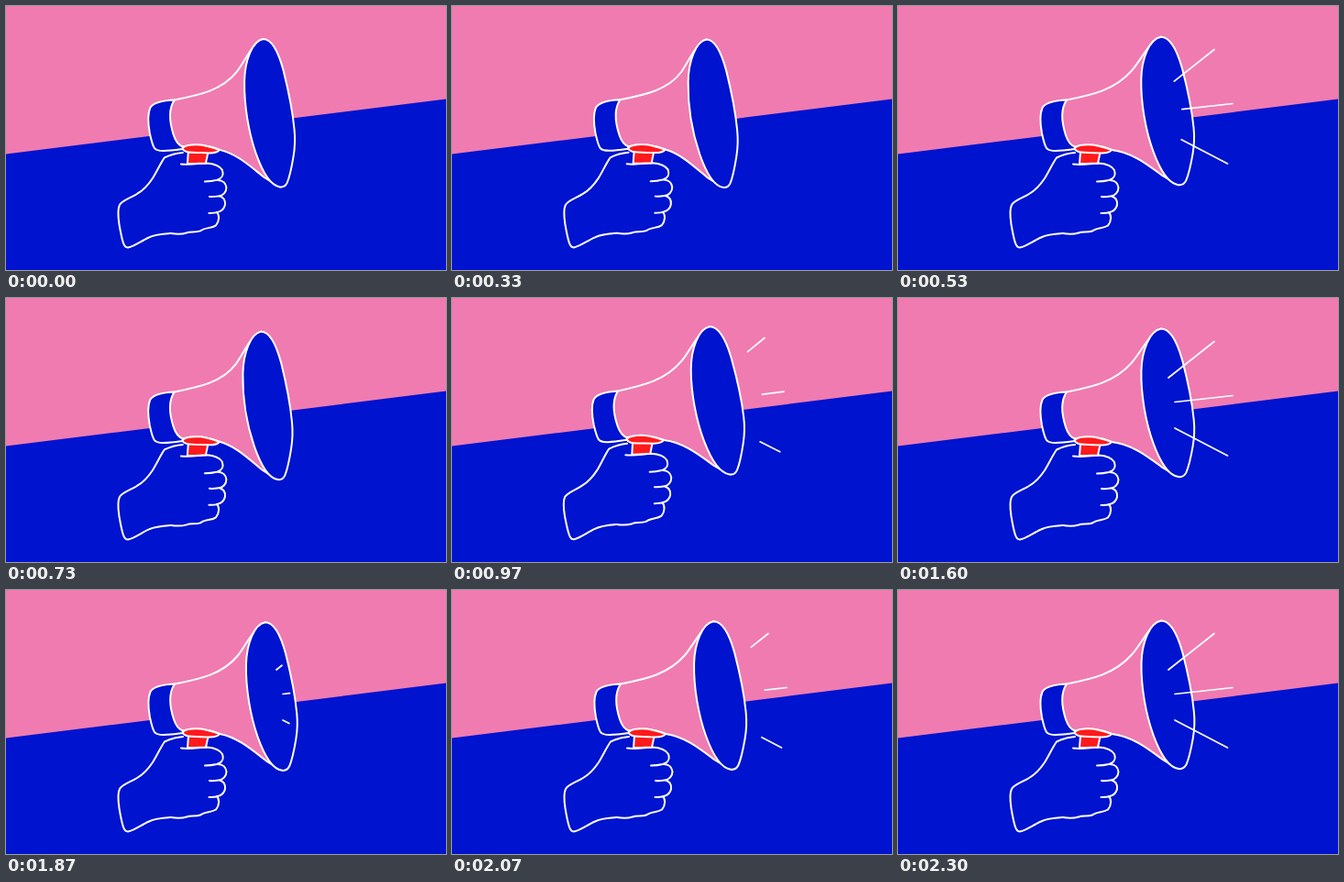
An HTML page for the animation above (2.33 s loop, 480 by 288 pixels).

```html
<!DOCTYPE html>
<html lang="en">
<head>
<meta charset="utf-8">
<title>Megaphone</title>
<style>
  html, body { margin: 0; width: 100%; height: 100%; overflow: hidden; background: #0013cf; }
  svg { display: block; width: 100%; height: 100%; }
  .line { stroke: #fff; stroke-width: 2; stroke-linecap: round; stroke-linejoin: round; }
  .blue { fill: #0013cf; }
  .pink { fill: #f07bb0; }
  .red { fill: #ff1a1c; }
  .bare { fill: none; }
  #rays { stroke-width: 1.7; }
</style>
</head>
<body>
<svg viewBox="0 0 480 288" preserveAspectRatio="none">
  <rect class="blue" width="480" height="288"/>
  <path class="pink" d="M0,0H480V101.500L0,161.500Z"/>
  <g id="arm" class="line">
    <path class="blue" d="M184,102.500C172,103 161,105 157.500,111C154.500,118 155,128 157,139C158.500,146 160,152 162,155C164,158 168,158 172,158C180,158 186,157 193,156L200,140Z"/>
    <path id="horn" class="pink"/>
    <path id="mouth" class="blue"/>
    <path class="bare" d="M193,160C186,160.500 177,163.500 173,165.500C169,171 165,180 160,188C156,194 150,201 143,205C136,209.500 127,212 124,217C121.500,222 122.500,231 123.500,238C125,247 126,252 127.500,257C128.500,261 130.500,263.500 133,263.500C140,262 148,256 156,252.500C163,249 172,248.500 180,248C186,249 192,249 197,247.500C201,245.500 207,247.500 212,245.500C217,241.500 224,243 229,239.500C233,235 233,228 230,225"/>
    <path class="bare" d="M191,172.500C202,174 211,171.500 219,171.500C226,172 233,174 236,179C238,185 236,188 230,190C226,191 222,191.500 217,191.500M231,190C237,190 240,194 240.500,198C240.500,203 237,207 232,207.500C229,208 226,208.500 222,208M233,207.500C238,209 239.500,213 239,217C238,222 235,224 231,225C228,226 225,226 221.500,226"/>
    <path class="red" d="M199,159L220.500,160L218,171.500C212,171.500 206,172.500 198,172Z"/>
    <path class="red" d="M192.500,155C197,151 206,151 213,151.500C220,152.500 227,155 233,157C231,160 227,160.500 222,160.500C214,160 204,160.500 197,159C194,158 193,157 192.500,155Z"/>
    <path id="rays" class="bare"/>
  </g>
</svg>
<script>
  const LOOP = 2330, STEP = 100 / 3, CYCLE = 11;
  const HORN = "M184,102.5C212,97 236,92 252,72C262,59 268,42 281,36L275,110L300,197.5C293,194 288,191 282,187C268,176 252,161 233,157C222,152 204,150 193,153.5C188,152 185,147 183,141C178.5,127 177.5,112 184,102.5Z";
  const MOUTH = "M281,36C290,36 297,48 303,70C308,90 313,113 315,135C316,145 315.5,155 314,164C312,176 310,186 307,193C305,197 302,198 299,197.5C289,196 280,181 273,161C265,138 260,108 260.5,82C261,60 269,38 281,36Z";
  const RAYS = [[295, 87, 345, 47.5], [302, 113.5, 365, 106.5], [302, 142, 359.5, 172]];
  // phase in the cycle, reach of the bell
  const REACH = [[0, .05], [1, .5], [3, 1], [5, .97], [7, .8], [8.5, .3], [10, 0], [11, .05]];
  const REST = .3;

  const $ = id => document.getElementById(id);
  const clamp = v => Math.min(1, Math.max(0, v));
  const ramp = (v, a, b) => clamp((v - a) / (b - a));

  function track(keys, x) {
    const i = keys.findIndex(k => k[0] > x);
    const [a, b] = [keys[i - 1], keys[i]];
    return a[1] + (b[1] - a[1]) * ramp(x, a[0], b[0]);
  }

  // push the points near the bell outwards
  const stretch = (path, e) => path.replace(/([\d.]+),([\d.]+)/g, (_, px, py) => {
    const x = +px, y = +py, k = e * ramp(x, 233, 260);
    return (x + k * (7 + .074 * (x - 258))).toFixed(2) + "," + (y - 3.5 * k).toFixed(2);
  });

  const bump = (n, mid, half, size) =>
    size * Math.cos(clamp(Math.abs(n - mid) / half) * Math.PI / 2) ** 2;

  function ray([x1, y1, x2, y2], from, to) {
    const at = k => (x1 + (x2 - x1) * k) + "," + (y1 + (y2 - y1) * k);
    return "M" + at(from) + "L" + at(to);
  }

  function draw(now) {
    const tick = Math.min(69, Math.floor((now % LOOP + 3.5) / STEP));
    const n = tick < 2 ? .5 : tick;
    const phase = n % CYCLE;
    const e = track(REACH, phase) - REST;
    const tilt = bump(n, 6, 7, .01) + bump(n, 27, 6, .0245);
    const from = ramp(phase, 4.5, 8.5);
    const to = phase < 1 ? 0 : phase < 3 ? .12 + .43 * (phase - 1) : 1;

    $("horn").setAttribute("d", stretch(HORN, e));
    $("mouth").setAttribute("d", stretch(MOUTH, e));
    $("rays").setAttribute("d", from < to ? RAYS.map(r => ray(r, from, to)).join("") : "");
    $("arm").setAttribute("transform", `rotate(${-tilt * 180 / Math.PI} 125 263)`);
  }

  const start = performance.now();
  function loop() {
    draw(performance.now() - start);
    requestAnimationFrame(loop);
  }
  loop();
</script>
</body>
</html>
```
